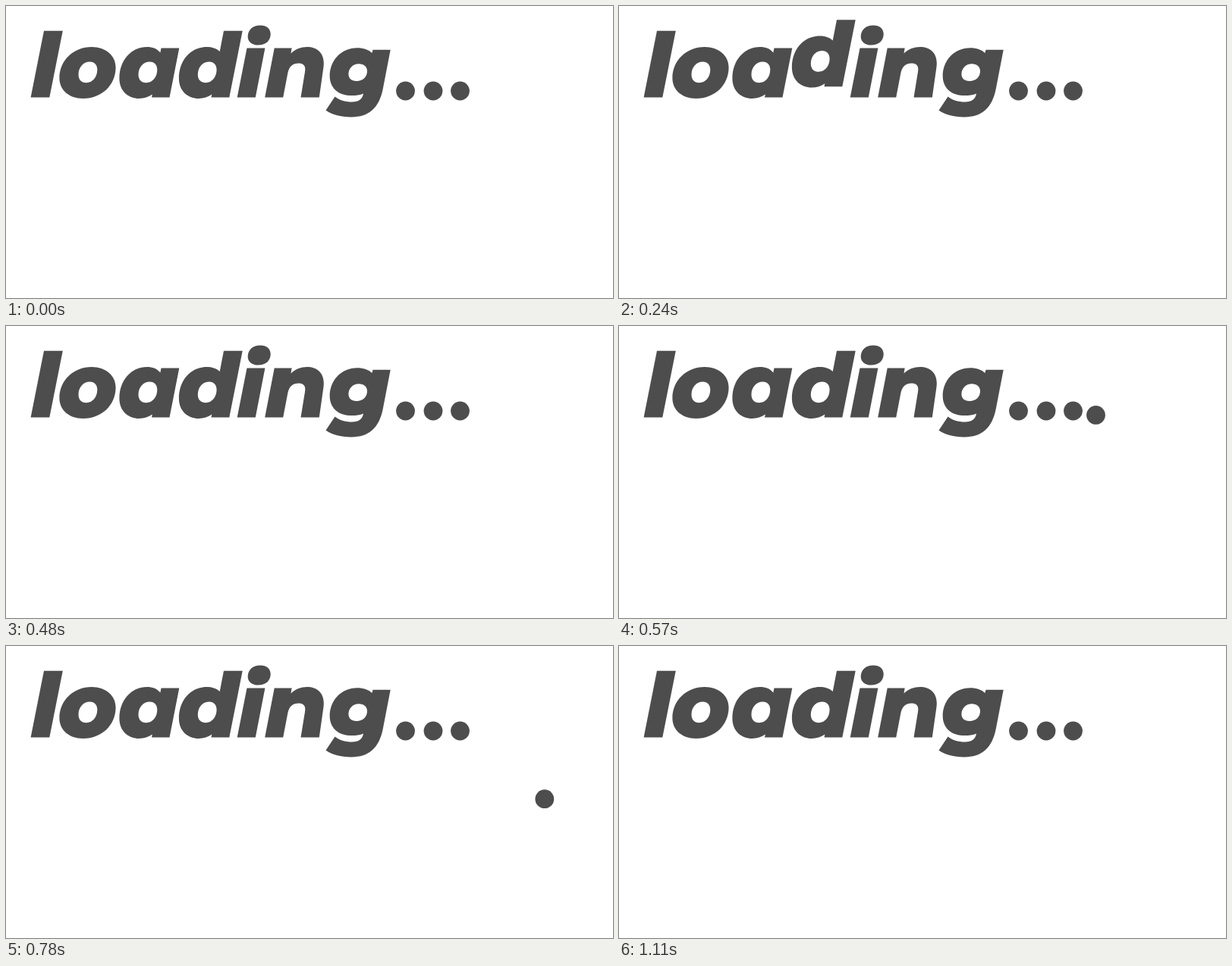
An HTML page that plays this animation: 800 by 385 pixels, repeating every 1410 ms.

```html
<!DOCTYPE html>
<html lang="en">
<head>
<meta charset="utf-8">
<title>loading...</title>
<style>
  html, body { margin: 0; width: 100%; height: 100%; overflow: hidden; background: #fff; }
  svg { display: block; width: 100%; height: 100%; }
  text { font: italic 900 118px Inter, sans-serif; }
</style>
</head>
<body>
<svg viewBox="0 0 800 385" fill="#4d4d4d" fill-rule="evenodd">
  <text x="33" y="121" fill="none">loading...</text>
  <g id="word"></g>
  <g id="ellipsis"></g>
  <g id="flight"></g>
</svg>
<script>
const STEP = 30, LOOP = 1410, LAST = 37;
const HOP = 14.4, RADIUS = 12.4;
const byId = id => document.getElementById(id);

function add(parent, tag, attrs) {
  const el = document.createElementNS("http://www.w3.org/2000/svg", tag);
  for (const key in attrs) el.setAttribute(key, attrs[key]);
  return parent.appendChild(el);
}

// Counter shared by o, a and d, placed by its left edge.
const counter = x => `M${x} 90.5c0-9.5 6.3-17 15-17c6.3 0 9.8 4.3 9.8 10.5
  c0 9.8-6.3 17.2-14.6 17.2c-6.5 0-10.2-4.3-10.2-10.7Z`;

const letters = [
  "M50 32.7H74.8L57.3 120.6H32.6Z",
  "M113 54C131.5 54 144.6 65.5 144.6 81C144.6 104 126.5 122 101.5 122C83 122 70.4 110.8 70.4 95C70.4 72 88.5 54 113 54Z" + counter(95.5),
  "M204.5 55.6H228.3L215.5 120.6H192L192.8 116.6C188 120.2 182 122 175.5 122C161.5 122 149.4 112.5 149.4 95.5C149.4 71.5 165 54 186 54C193 54 199.5 56.3 203.3 61.5Z" + counter(174.5),
  "M287 32.7H311.7L294.3 120.6H270.5L271.3 116.6C266.5 120.2 260.5 122 254 122C240 122 227.9 112.5 227.9 95.5C227.9 71.5 243.5 54 264.5 54C271 54 277.5 55.9 281.7 60Z" + counter(252.8),
  "M317.5 55.6H341.4L328.8 120.6H304.7ZM335 25.6C343.5 25.6 348.7 30 348.7 37C348.7 46 342 51.6 332.5 51.6C324 51.6 318.7 47 318.7 40.5C318.7 31.5 325.5 25.6 335 25.6Z",
  "M353.7 55.6H376.7L375.4 62.4C381.5 56.8 389 54 396.5 54C410.5 54 418.8 62 418.8 75.5C418.8 78.3 418.5 81.3 417.9 84.5L412.8 120.6H388.5L394 86.8C395.4 79.3 392.5 75.4 386 75.4C378 75.4 373 79.8 371.4 88.3L365.2 120.6H341.2Z",
  "M483.5 57.8H506.7L497 108C492 135 478 146.4 455 146.4C441 146.4 429 143 421.5 137.5L433.5 119.5C439 124 447 126.5 456 126.5C465 126.5 469.5 123 471 115.5C466 117.6 459 118.4 452.5 118C437 117.2 426.7 107 426.7 92.5C426.7 72 441.5 55.2 463 55.2C471 55.2 478 57.5 482.3 62Z" +
  "M465 76.3C471.8 76.3 476 80.3 476 85.7C476 93.8 470 99 462 99C455.3 99 451.4 95.2 451.4 90C451.4 82.2 457.2 76.3 465 76.3Z"
].map(d => add(byId("word"), "path", { d }));

const addDot = (parent, cx, cy) => add(parent, "circle", { cx, cy, r: RADIUS });
[526.5, 563, 598.5].forEach(x => addDot(byId("ellipsis"), x, 112));

// Flight of the loose dot: step, x, y.
const path = [
  [16, 598.5, 112], [18, 614.5, 113], [22, 674, 138], [25, 704, 185],
  [28, 716, 236], [31, 714.3, 287], [32, 709.5, 306], [33, 672, 338],
  [34, 593, 347.5], [35, 494, 300], [36, 456.5, 157.5]
];
const TRAIL_START = 32, TRAIL_END = 36;

function flightPoint(step) {
  let i = 0;
  while (i < path.length - 2 && step > path[i + 1][0]) i++;
  const a = path[i], b = path[i + 1];
  const before = path[Math.max(i - 1, 0)];
  const after = path[Math.min(i + 2, path.length - 1)];
  const span = b[0] - a[0], u = (step - a[0]) / span;
  return [1, 2].map(k => {
    const m0 = (b[k] - before[k]) / (b[0] - before[0]) * span;
    const m1 = (after[k] - a[k]) / (after[0] - a[0]) * span;
    const d = b[k] - a[k];
    return a[k] + u * (m0 + u * (3 * d - 2 * m0 - m1 + u * (m0 + m1 - 2 * d)));
  });
}

const trail = Array.from({ length: TRAIL_END - TRAIL_START + 1 },
  () => addDot(byId("flight"), 0, 0));

function draw(time) {
  const step = Math.min(Math.floor((time % LOOP) / STEP), LAST);

  letters.forEach((el, i) => {
    const lift = HOP * Math.max(0, 1 - Math.abs(step - 2 * (i + 1)) / 2);
    el.setAttribute("transform", `translate(0 ${-lift})`);
  });

  trail.forEach((dot, i) => {
    const at = step - i;
    const shown = step > 16 && step <= TRAIL_END && (i === 0 || at >= TRAIL_START);
    dot.setAttribute("visibility", shown ? "visible" : "hidden");
    if (!shown) return;
    const [x, y] = flightPoint(at);
    dot.setAttribute("cx", x);
    dot.setAttribute("cy", y);
  });
}

const start = performance.now();
function tick() {
  draw(performance.now() - start);
  requestAnimationFrame(tick);
}
tick();
</script>
</body>
</html>
```
